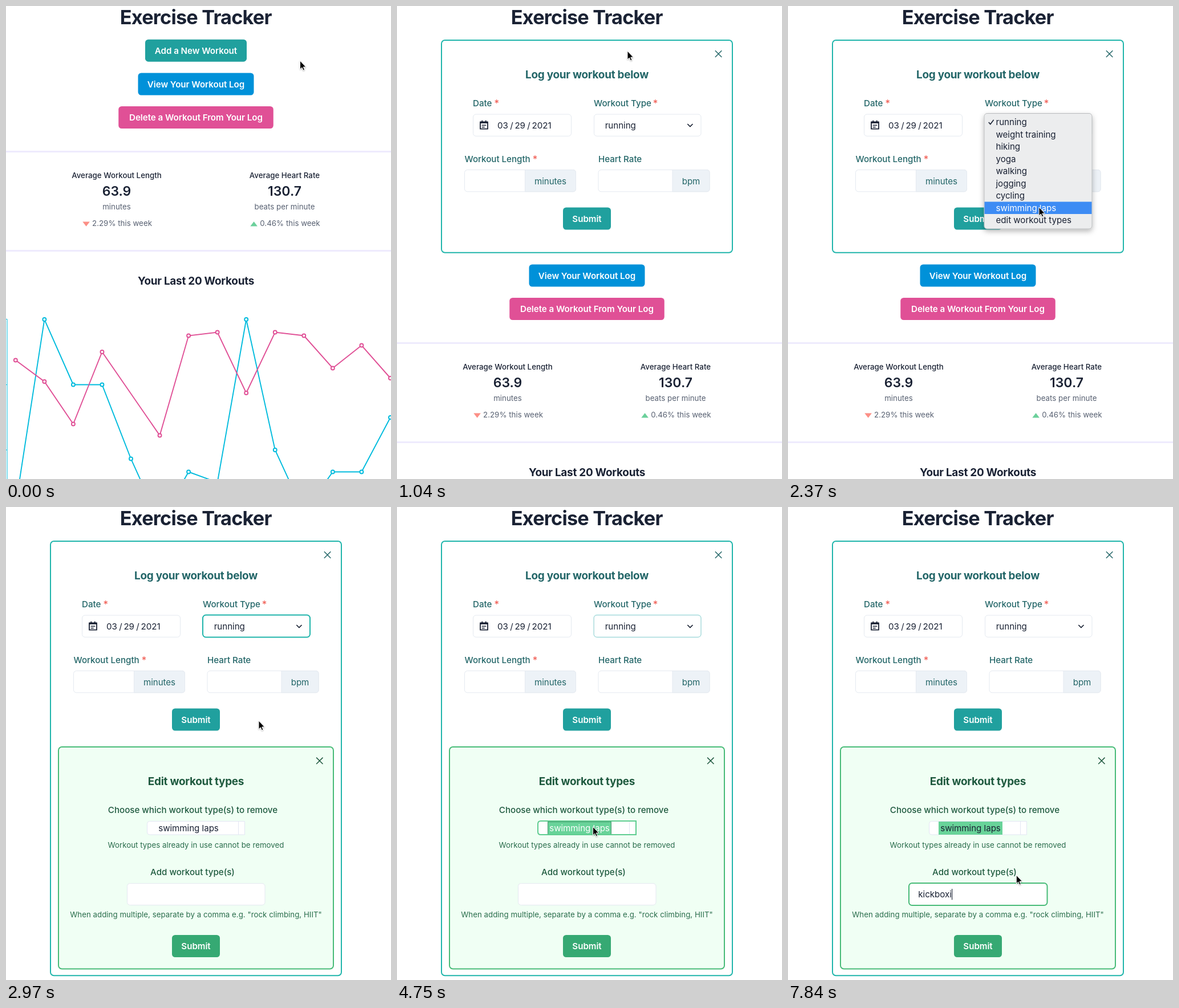
Recreate the animation shown at these times as an HTML page. Size 675x830 px, loop 7990 ms.

```html
<!DOCTYPE html>
<html lang="en">
<head>
<meta charset="utf-8">
<title>Exercise Tracker</title>
<style>
html, body { margin: 0; width: 100%; height: 100%; overflow: hidden; background: #fff; }
svg { display: block; width: 675px; height: 830px; }
text {
  font: 400 15.17px Inter, sans-serif; font-optical-sizing: none;
  letter-spacing: -.05px; text-anchor: middle; fill: #1a2234;
}
.left { text-anchor: start; }
.title { font-size: 34.3px; font-weight: 700; letter-spacing: -.82px; }
.head { font-size: 18.95px; font-weight: 700; letter-spacing: -.28px; }
.btn { font-weight: 600; fill: #fff; }
.label { font-weight: 500; letter-spacing: -.03px; }
.small { font-size: 13.27px; letter-spacing: .03px; }
.stat { font-size: 23px; font-weight: 600; letter-spacing: 0; }
.gray { fill: #586172; }
.teal { fill: #236668; }
.green { fill: #1f5a3f; }
.note { fill: #2a6c4c; }
.white { fill: #fff; }
.star { font-size: 17px; fill: #f0564c; }
</style>
</head>
<body>
<svg id="stage" viewBox="0 0 675 830"></svg>
<script>
const LOOP = 7990, START = 290, TICK = 148;
const TEAL = '#20a09e', GREEN = '#36a973', BLUE = '#0091d9', PINK = '#e05096';
const LINE = '#e4e9f0', OPEN_SHIFT = 336;
const stage = document.getElementById('stage');

const text = (cls, x, y, s, extra = '') => `<text class="${cls}" x="${x}" y="${y}" ${extra}>${s}</text>`;
const rect = (x, y, w, h, r, fill, stroke = 'none', sw = 1, extra = '') =>
  `<rect x="${x}" y="${y}" width="${w}" height="${h}" rx="${r}" fill="${fill}" stroke="${stroke}" stroke-width="${sw}" ${extra}/>`;
const path = (d, stroke, sw, fill = 'none', extra = '') =>
  `<path d="${d}" fill="${fill}" stroke="${stroke}" stroke-width="${sw}" ${extra}/>`;
const button = (y, w, color, s) =>
  rect(333 - w / 2, y, w, 39, 5.5, color) + text('btn', 333, y + 25.2, s);
const cross = (x, y, color) =>
  path(`M${x - 5.7} ${y - 5.7}l11.4 11.4m0 -11.4l-11.4 11.4`, color, 1.5);

// Chart: one value per workout, null where a series has no point
const blueY = [877, 550, 664.5, 664.5, 794.5, 906, 817.5, 836, 550, 779, 889, 817.5, 817.5, 722];
const pinkY = [621.5, 659, 733.5, 607, null, 753.5, 578.5, 572.5, 679, 572.5, 578.5, 635.5, 595.5, 653];
function series(ys, color) {
  const pts = ys.map((y, i) => [16.8 + i * 50.55, y]).filter(p => p[1] !== null);
  return `<polyline points="${pts.join(' ')}" fill="none" stroke="${color}" stroke-width="1.9"/>` +
    pts.map(([x, y]) => `<circle cx="${x}" cy="${y}" r="3" fill="#fff" stroke="${color}" stroke-width="1.9"/>`).join('');
}

const average = (x, name, value, unit, change) =>
  text('label small', x, 301.5, name) + text('stat', x, 333, value) +
  text('small gray', x, 357, unit) + text('small gray', x + 9.5, 385.6, change);

const page =
  button(117.5, 203, BLUE, 'View Your Workout Log') +
  button(176, 271.5, PINK, 'Delete a Workout From Your Log') +
  rect(0, 254, 675, 3, 0, '#eeebfd') + rect(0, 428, 675, 3, 0, '#eeebfd') +
  average(194, 'Average Workout Length', '63.9', 'minutes', '2.29% this week') +
  average(488.5, 'Average Heart Rate', '130.7', 'beats per minute', '0.46% this week') +
  path('M134.3 378.5h12.6l-6.3 8.3z', 'none', 0, '#fc8f86') +
  path('M428.3 386.6h12.6l-6.3 -8.3z', 'none', 0, '#6bd09b') +
  text('head', 333, 489, 'Your Last 20 Workouts') +
  path('M0 549.5H2V840M0 664.5H2M0 779H2', '#00bbdd', 1) +
  series(blueY, '#00bbdd') + series(pinkY, PINK);

const calendar =
  path('M146 203.3h13v12.4h-13zM149.3 200.8v2m6.4 -2v2', '#1a2234', 1.8, 'none', 'stroke-linejoin="round"') +
  path('M146 204.6h13', '#1a2234', 2.6) + path('M148.7 209.3h7.6m-7.6 3.2h5', '#1a2234', 1.5);

const addonField = (x, split, end, unit) =>
  rect(x, 287.5, end - x, 38.3, 5, '#fff', LINE) +
  path(`M${split} 287.5H${end - 5}q5 0 5 5v28.3q0 5 -5 5H${split}z`, LINE, 1, '#edf2f7') +
  text('teal', (split + end) / 2, 312.5, unit);

const logForm =
  cross(563.6, 84, '#236668') +
  text('head teal', 333, 127, 'Log your workout below') +
  text('label teal left', 133, 176, 'Date') + text('star', 174.7, 177, '*') +
  text('label teal left', 345, 176, 'Workout Type') + text('star', 453, 177, '*') +
  rect(133.5, 190, 172, 38.3, 5, '#fff', LINE) + calendar +
  [[185.5, '03'], [201, '/'], [215.7, '29'], [231, '/'], [253.5, '2021']].map(([x, s]) => text('', x, 214.5, s)).join('') +
  rect(345.5, 190, 187.5, 38.3, 5, '#fff', LINE) +
  text('left', 364.7, 214.5, 'running') +
  path('M509.3 207l4.6 4.6l4.6 -4.6', '#1a2234', 1.7) +
  text('label teal left', 118.5, 273.5, 'Workout Length') + text('star', 242, 274.5, '*') +
  text('label teal left', 353, 273.5, 'Heart Rate') +
  addonField(118.5, 224.5, 313.5, 'minutes') + addonField(353, 483, 548, 'bpm') +
  button(353.5, 84, TEAL, 'Submit');

function editForm(k) {
  const picked = k >= 29, listFocus = k >= 29 && k < 35, inputFocus = k >= 35;
  const kept = Math.max(0, k < 48 ? Math.min(4, k - 42) : k - 43);
  const caret = inputFocus && (k < 38 || k >= 42);
  return rect(92, 421, 482, 389.5, 6, '#f0fff4', '#48bb78', 2) +
    cross(549.8, 445.3, '#1f5a3f') +
    text('head green', 333, 488, 'Edit workout types') +
    text('label green', 327.5, 537.2, 'Choose which workout type(s) to remove') +
    path('M418.5 551.5V575H252.5q-5 0 -5 -5v-13.5q0 -5 5 -5zM407.5 551.5V575', '#e2e6f3', 1, '#fff') +
    (picked ? rect(264, 552, 112, 23, 0, '#68d399') : '') +
    (listFocus
      ? rect(264.5, 552.5, 111, 22, 0, 'none', '#245a40', 1, 'stroke-dasharray="1 1"') +
        path('M419 551V575H252q-5 0 -5 -5V556q0 -5 5 -5z', '#5fcd90', 2)
      : '') +
    text(listFocus ? 'white' : '', 320, 569.3, 'swimming laps') +
    text('small note', 333, 598.4, 'Workout types already in use cannot be removed') +
    text('label green', 327, 646.3, 'Add workout type(s)') +
    (inputFocus
      ? rect(212, 660, 242.5, 39, 5.5, '#fff', '#48bb78', 2)
      : rect(212.5, 660.5, 241.5, 38, 5, '#fff', LINE)) +
    text('left', 228.3, 685, 'kickboxi'.slice(0, kept), 'id="typed"') +
    (caret ? rect(228.5, 670, 1.1, 19.3, 0, '#1a2234', 'none', 0, 'id="caret"') : '') +
    text('small note', 333, 720.3, 'When adding multiple, separate by a comma e.g. "rock climbing, HIIT"') +
    button(751, 84, GREEN, 'Submit');
}

const types = ['running', 'weight training', 'hiking', 'yoga', 'walking', 'jogging',
  'cycling', 'swimming laps', 'edit workout types'];
function menu(k, y) {
  const active = k > 10 ? Math.floor((y - 192.8) / 21.5) : -1;
  return rect(344, 188.5, 189, 202.5, 5, '#ecedee', '#b9bbbd', 1, 'filter="url(#shade)"') +
    types.map((name, i) => (i === active ? rect(344.5, 193 + i * 21.5, 188, 21.5, 0, '#3d8cf4') : '') +
      text(i === active ? 'left white' : 'left', 364.5, 209 + i * 21.5, name)).join('') +
    path('M351.8 204l3 3.4l5.8 -7.6', active === 0 ? '#fff' : '#1a2234', 1.6);
}

// Pointer path: tick, x, y
const route = [[-1, 515.5, 96], [3, 410, 77], [5, 404, 79], [6, 404, 87], [9, 417, 198], [10, 417, 200],
  [14, 440, 353], [15, 443, 375], [18, 443, 375], [23, 352, 552], [24, 352, 552], [28, 344, 561],
  [30, 343.5, 561], [32, 385, 657], [34, 401, 653], [36, 401, 649], [38, 400.3, 646]];
function pointerAt(k) {
  const i = route.findIndex(p => p[0] >= k);
  if (i < 0) return route[route.length - 1].slice(1);
  if (i === 0) return route[0].slice(1);
  const [a, ax, ay] = route[i - 1], [b, bx, by] = route[i], u = (k - a) / (b - a);
  return [ax + (bx - ax) * u, ay + (by - ay) * u];
}

const defs = h => `<defs>
  <filter id="shade" x="-20%" y="-20%" width="140%" height="150%"><feDropShadow dx="0" dy="4" stdDeviation="5" flood-opacity=".28"/></filter>
  <filter id="soft" x="-50%" y="-50%" width="200%" height="200%"><feDropShadow dx="0" dy="1" stdDeviation="1" flood-opacity=".35"/></filter>
  <clipPath id="fold"><rect x="70" y="58" width="530" height="${h}"/></clipPath></defs>`;

function draw(k) {
  const editing = k >= 18;
  const open = k < 3 ? 0 : k === 3 ? .4 : k === 4 ? .85 : 1;
  const height = editing ? 762.3 : 372.7;
  const ring = !editing || k > 30 ? 0 : k < 29 ? 1 : k === 29 ? .6 : .35;
  const [x, y] = pointerAt(k);
  let out = defs(open < 1 ? 39 + OPEN_SHIFT * open : 772) + text('title', 332.7, 31.7, 'Exercise Tracker');
  if (!editing) out += `<g transform="translate(0 ${OPEN_SHIFT * open})">${page}</g>`;
  out += open
    ? `<g clip-path="url(#fold)" opacity="${open}">` + rect(78, 60, 510, height, 6, '#fff', '#20b5ab', 2) + logForm +
      (ring ? rect(345, 189.5, 188, 39, 5.5, 'none', '#20b5ab', 1 + ring, `opacity="${ring}"`) : '') +
      (editing ? editForm(k) : '') + '</g>'
    : button(58.7, 178, TEAL, 'Add a New Workout');
  if (k >= 10 && !editing) out += menu(k, y);
  out += path('M0 0V15L3.4 11.9L5.6 17L8 16L5.8 11H10.4Z', '#fff', 1, '#000',
    `transform="translate(${x} ${y})" filter="url(#soft)"`);
  stage.innerHTML = out;

  const caret = document.getElementById('caret');
  if (caret) caret.setAttribute('x', 228.5 + document.getElementById('typed').getComputedTextLength());
}

let shown = null;
function frame() {
  const k = Math.max(-1, Math.floor((performance.now() % LOOP - START) / TICK));
  if (k !== shown) draw(shown = k);
  requestAnimationFrame(frame);
}
frame();
</script>
</body>
</html>
```
